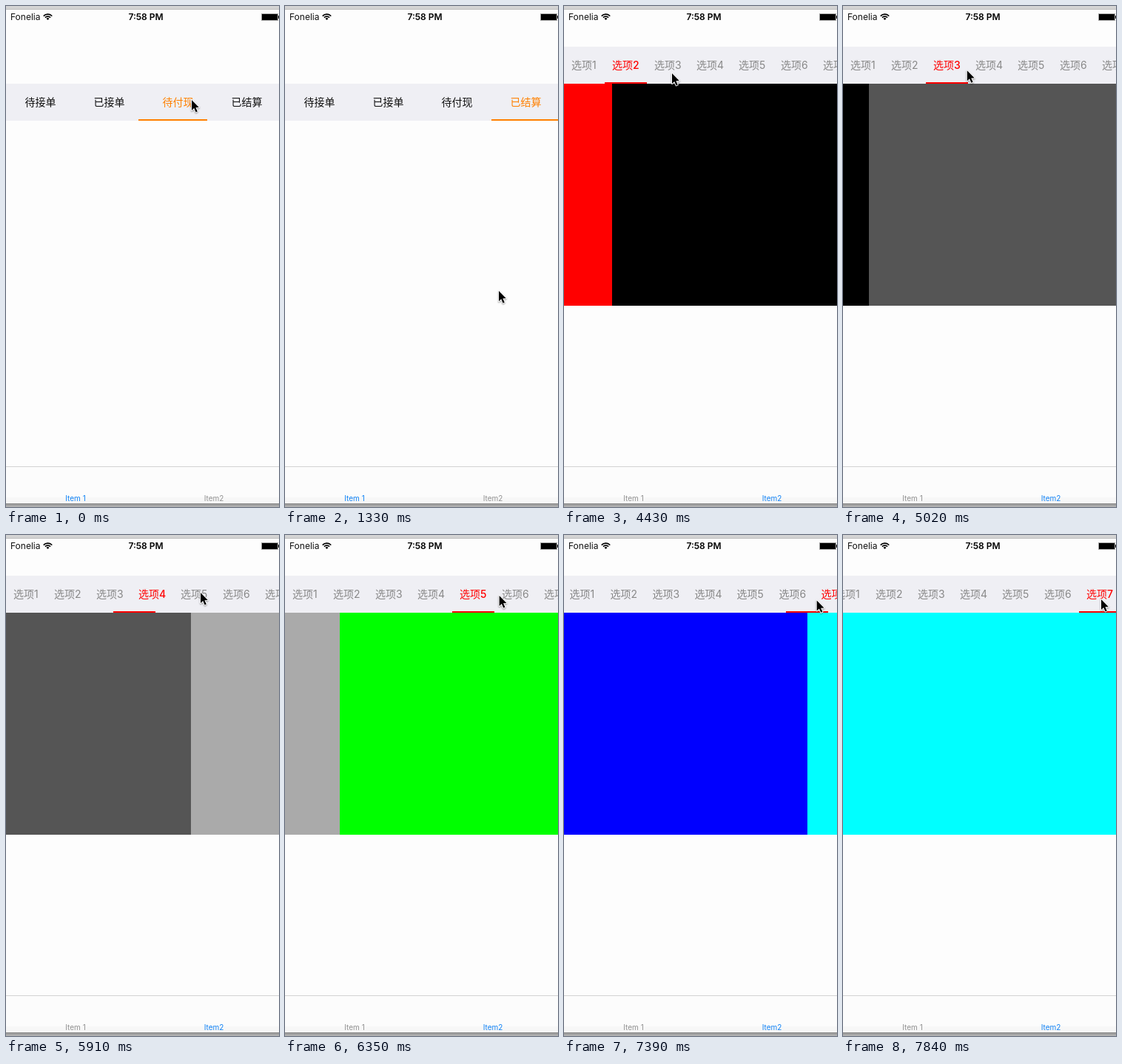
Animation, 369 px wide and 677 px high, one loop 7.99 s. Source, as an HTML page with a canvas:

```html
<!DOCTYPE html>
<html lang="zh-CN">
<head>
<meta charset="utf-8">
<title>Segmented pager</title>
<style>
html, body { margin: 0; width: 100%; height: 100%; overflow: hidden; background: #fdfdfd; }
canvas { display: block; }
</style>
</head>
<body>
<canvas id="stage" width="369" height="677"></canvas>
<script>
const ctx = document.getElementById('stage').getContext('2d');
const LOOP = 7990, STEPS = 54, STEP = LOOP / STEPS;
const PAGE_W = 375, ORDER_W = 93, OPTION_W = 57;
const SWITCH_AT = 2160;
const FONT = 'Inter, "Noto Sans CJK SC", "Noto Sans CJK JP", sans-serif';
const BAR = '#efeff4', PAPER = '#fdfdfd';
const ORANGE = '#ff8000', RED = '#f00', BLUE = '#1283f5', GREY = '#929292';

const orders = ['待接单', '已接单', '待付现', '已结算'];
const pages = [RED, '#000', '#555', '#aaa', '#0f0', '#00f', '#0ff'];

// Each tap moves the selection on by one.
const orderTaps = [-185, 930];
const optionTaps = [4221, 4790, 5801, 6150, 6887, 7330];

const at = (time, x, y) => ({ time, x, y });
const pointerStops = [
  at(0, 251, 127), at(300, 338, 127),       // to the last order tab
  at(1040, 338, 127), at(1330, 289, 385),   // down the page
  at(2070, 278, 651), at(2220, 278, 651),   // bottom bar
  at(2950, 141, 208), at(3250, 84, 84),     // up to the options
  at(4290, 84, 84), at(4430, 146, 91),
  at(5800, 200, 82), at(5910, 263, 78),
  at(6800, 315, 86), at(6940, 334, 90), at(7840, 349, 87)
];

const clamp = v => Math.max(0, Math.min(1, v));
const ease = v => (1 - Math.cos(Math.PI * clamp(v))) / 2;
const mix = (a, b, k) => a + (b - a) * k;

const selected = (taps, t) => taps.filter(tap => t >= tap).length;
const travel = (taps, t, duration, curve) =>
  taps.reduce((sum, tap) => sum + curve((t - tap) / duration), 0);
const markerPos = (taps, t) => travel(taps, t, 200, clamp);

function rect(x, y, w, h, color) {
  ctx.fillStyle = color;
  ctx.fillRect(x, y, w, h);
}

function text(str, x, y, size, color, weight = 400, align = 'left') {
  ctx.font = `${weight} ${size}px ${FONT}`;
  ctx.textAlign = align;
  ctx.fillStyle = color;
  ctx.fillText(str, x, y);
}

function wifi(x, y) {
  const from = -Math.PI * 0.76, to = -Math.PI * 0.24;
  ctx.strokeStyle = ctx.fillStyle = '#000';
  ctx.lineWidth = 1.6;
  for (const r of [4.9, 7.9]) {
    ctx.beginPath();
    ctx.arc(x, y, r, from, to);
    ctx.stroke();
  }
  ctx.beginPath();
  ctx.moveTo(x, y);
  ctx.arc(x, y, 2.8, from, to);
  ctx.fill();
}

function statusBar() {
  rect(0, 0, 369, 4, '#d4d4d4');
  rect(0, 4, 369, 1, '#bdbdbd');
  text('Fonelia', 6, 19, 12, '#111');
  wifi(56.5, 19);
  text('7:58 PM', 189, 19, 12, '#000', 600, 'center');
  rect(345, 10, 23, 10, '#aaa');
  rect(346, 11, 21, 8, '#000');
  rect(368, 13, 1, 4, '#000');
}

function tabBar(second) {
  rect(0, 622, 369, 50, '#fcfcfc');
  rect(0, 622, 369, 1, '#d2d2d2');
  rect(0, 664, 369, 7, '#f7f7f7');
  text('Item 1', 94, 668.5, 10, second ? GREY : BLUE, 400, 'center');
  text('Item2', 281, 668.5, 10, second ? BLUE : GREY, 400, 'center');
  const shade = ctx.createLinearGradient(0, 672, 0, 677);
  shade.addColorStop(0, '#8c8c8c');
  shade.addColorStop(1, '#b8b8b8');
  rect(0, 672, 369, 5, shade);
}

function orderScreen(t) {
  const active = 1 + selected(orderTaps, t);
  rect(0, 105, 369, 50, BAR);
  orders.forEach((label, i) => {
    const on = i === active;
    text(label, (i + 0.5) * ORDER_W, 135, 14, on ? ORANGE : '#111', on ? 500 : 400, 'center');
  });
  const marker = 1 + markerPos(orderTaps, t);
  rect(Math.round(marker * ORDER_W), 153, ORDER_W, 2, ORANGE);
}

function optionScreen(t) {
  // The strip scrolls to its end with the last tap.
  const scroll = 21 * ease((t - optionTaps.at(-1)) / 300);
  const left = i => Math.max(0, i * OPTION_W - 2) - scroll;
  const active = selected(optionTaps, t);
  rect(0, 55, 369, 50, BAR);
  pages.forEach((_, i) => {
    const on = i === active;
    text('选项' + (i + 1), left(i) + 10, 85, 14, on ? RED : '#888', on ? 500 : 400);
  });
  const marker = markerPos(optionTaps, t);
  rect(Math.round(left(marker)), 103, mix(OPTION_W - 2, OPTION_W, clamp(marker)), 2, RED);

  const pos = travel(optionTaps, t, 300, ease);
  pages.forEach((color, i) => rect(Math.round((i - pos) * PAGE_W), 105, PAGE_W, 300, color));
}

function pointer(t) {
  const b = pointerStops.find(stop => stop.time > t) || pointerStops.at(-1);
  const a = pointerStops[pointerStops.indexOf(b) - 1];
  const k = ease((t - a.time) / (b.time - a.time));
  ctx.save();
  ctx.translate(mix(a.x, b.x, k), mix(a.y, b.y, k));
  const arrow = new Path2D('M0 0V14L3.2 11L5.6 16.4L7.8 15.4L5.4 10.2L9.8 10Z');
  ctx.lineJoin = 'round';
  ctx.lineWidth = 2;
  ctx.strokeStyle = '#fff';
  ctx.shadowColor = 'rgba(0,0,0,.4)';
  ctx.shadowBlur = 2;
  ctx.shadowOffsetY = 1;
  ctx.stroke(arrow);
  ctx.shadowColor = 'transparent';
  ctx.fillStyle = '#000';
  ctx.fill(arrow);
  ctx.restore();
}

function draw(now) {
  // The motion is shown in even steps; the offset absorbs uneven step lengths.
  const step = Math.floor((now % LOOP + 15) / STEP);
  const t = Math.min(STEPS - 1, step) * STEP;
  const second = t >= SWITCH_AT;
  rect(0, 0, 369, 677, PAPER);
  statusBar();
  (second ? optionScreen : orderScreen)(t);
  tabBar(second);
  pointer(t);
}

let start = null;
function tick(now) {
  if (start === null) start = now;
  draw(now - start);
  requestAnimationFrame(tick);
}
draw(0);
requestAnimationFrame(tick);
</script>
</body>
</html>
```
